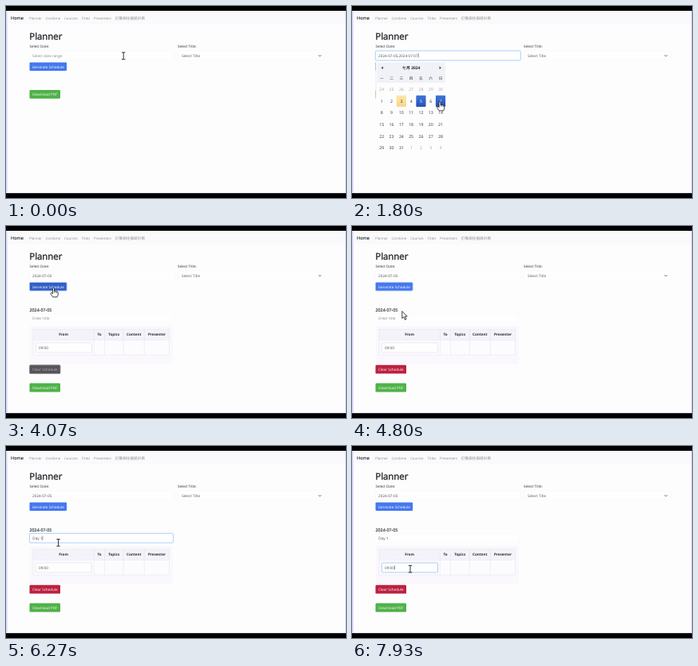
These frames come from a looping animation (426x240 px, 8 s). An HTML page:

```html
<!DOCTYPE html>
<html lang="en">
<head>
<meta charset="utf-8">
<title>Planner</title>
<style>
  html, body { margin: 0; width: 100%; height: 100%; overflow: hidden; background: #000; }
  svg { display: block; width: 100vw; height: 100vh; }
  text {
    font-family: "Open Sans", "Noto Sans", "Noto Sans CJK TC", "Noto Sans CJK", sans-serif;
    white-space: pre; text-rendering: geometricPrecision;
  }
</style>
</head>
<body>
<svg id="stage" viewBox="0 0 426 240"></svg>
<script>
const LOOP = 8000;
const stage = document.getElementById('stage');

function el(parent, tag, attrs = {}, content) {
  const node = document.createElementNS('http://www.w3.org/2000/svg', tag);
  for (const k in attrs) node.setAttribute(k, attrs[k]);
  if (content !== undefined) node.textContent = content;
  return parent.appendChild(node);
}
const group = (parent = stage) => el(parent, 'g');
const box = (p, x, y, w, h, fill, more = {}) =>
  el(p, 'rect', { x, y, width: w, height: h, fill, ...more });
const label = (p, x, y, str, size = 4.6, fill = '#2a2a2c', more = {}) =>
  el(p, 'text', { x, y, 'font-size': size, fill, ...more }, str);
const line = (p, d, stroke, width = 0.5, more = {}) =>
  el(p, 'path', { d, stroke, 'stroke-width': width, fill: 'none', ...more });
const mid = { 'text-anchor': 'middle' };
// Medium weight: regular letters with a thin outline
const medium = width => ({ stroke: '#212529', 'stroke-width': width });
const show = (node, on) => node.setAttribute('display', on ? 'inline' : 'none');

function button(p, x, y, w, h, color, str) {
  const g = group(p);
  const face = box(g, x, y, w, h, color, { rx: 1.2, 'stroke-width': 0.8 });
  const text = label(g, x + w / 2, y + h / 2 + 2, str, 4.55, '#fff', mid);
  return { g, face, text };
}

// Input with value, focus ring and blinking caret
function field(p, x, y, w, h, border, pad = 3.8) {
  const face = box(p, x, y, w, h, '#fefefe', { rx: 1.2, 'stroke-width': 0.7 });
  const text = label(p, x + pad, y + h / 2 + 1.7, '', 4.65);
  const caret = box(p, 0, y + h / 2 - 2.7, 0.5, 5.4, '#333');
  return (value, hint, focus, blink) => {
    text.textContent = value || hint;
    text.setAttribute('fill', value ? '#505054' : '#85858a');
    face.setAttribute('stroke', focus ? '#8fb9f2' : border);
    show(caret, focus && blink);
    if (focus) {
      const end = value ? text.getComputedTextLength() : 0;
      caret.setAttribute('x', x + pad + end + 0.2);
    }
  };
}

// Page
box(stage, 0, 0, 426, 240, '#000');
box(stage, 0, 6, 426, 228, '#d0d0fa');
box(stage, 1.6, 6, 423.4, 227.2, '#fdfdfe');
box(stage, 1.6, 6, 423.4, 17, '#fafafc');
label(stage, 6, 17.1, 'Home', 5.65, '#212529', medium(0.1));
[['Planner', 29], ['Combine', 49.5], ['Courses', 73], ['Titles', 94.5],
 ['Presenters', 110], ['訂餐與住宿統計表', 136.8]].forEach(([s, x], i) =>
  label(stage, x, 16.7, s, i < 5 ? 4.45 : 4.7, '#8c8c90'));
label(stage, 29.3, 42, 'Planner', 11.4, '#212529', medium(0.35));
label(stage, 29.5, 52.3, 'Select Date:', 4.5);
label(stage, 215, 52.3, 'Select Title:', 4.5);
const dateField = field(stage, 29.3, 56, 182, 12, '#f7f7fa');
box(stage, 215.3, 56, 184, 12, '#fefefe', { rx: 1.2, stroke: '#f7f7fa', 'stroke-width': 0.7 });
label(stage, 220, 63.8, 'Select Title', 4.65, '#5c5c60');
line(stage, 'M391.6 61.3l1.7 1.7 1.7-1.7', '#444', 0.8);
const generate = button(stage, 29.5, 70.4, 46.6, 10.6, '#4478ee', 'Generate Schedule');

// Schedule
const schedule = group();
label(schedule, 29.5, 107.3, '2024-07-05', 5.35, '#212529', medium(0.1));
const titleField = field(schedule, 29.5, 109.2, 180, 11.8, '#fafafc');
box(schedule, 30, 125, 179, 48, '#faf8fd');
box(schedule, 34, 129.2, 170.6, 13.4, '#f5f3fa');
box(schedule, 34, 142.6, 170.6, 18.6, '#fcfbfe');
const dots = { 'stroke-dasharray': '1 0.7' };
line(schedule, 'M34 129.2H204.6V161.2H34zM34 142.6H204.6M110.3 129.2V161.2M123.6 129.2V161.2M147 129.2V161.2M173.3 129.2V161.2',
  '#d5d0e0', 0.5, dots);
[['From', 72], ['To', 117], ['Topics', 135.2], ['Content', 160.2], ['Presenter', 189]].forEach(([s, x]) =>
  label(schedule, x, 137.4, s, 4.55, '#2a2a2c', { ...mid, 'font-weight': 700 }));
const timeField = field(schedule, 37.2, 146, 70.3, 12, '#e2dfea');
const clear = button(schedule, 29.5, 173.8, 38.5, 10.8, '#bd2140', 'Clear Schedule');
const download = button(stage, 29.5, 105, 38.5, 10.8, '#4fb248', 'Download PDF');

// Date picker
const defs = el(stage, 'defs');
function gradient(id, from, to) {
  const g = el(defs, 'linearGradient', { id, x1: 0, y1: 0, x2: 0, y2: 1 });
  el(g, 'stop', { offset: 0, 'stop-color': from });
  el(g, 'stop', { offset: 1, 'stop-color': to });
}
gradient('picked', '#3f76dc', '#2350b4');
gradient('today', '#fde79f', '#fbd48c');

const picker = group();
box(picker, 30, 70, 87.4, 116, '#fdfdfe');
box(picker, 31.4, 70.6, 85.6, 25.6, '#f0f2f7');
line(picker, 'M30 70V115', '#e0e0ea', 0.5);
label(picker, 74.2, 79, '七月 2024', 4.9, '#222', { ...mid, 'font-weight': 700 });
el(picker, 'path', { d: 'M38.8 75.5v3.4l-2.2-1.7zM109.6 75.5v3.4l2.2-1.7z', fill: '#333' });
const colX = c => 37.3 + 12.28 * c;
const rowY = r => 104.4 + 14.55 * r;
[...'一二三四五六日'].forEach((s, c) => label(picker, colX(c), 91.8, s, 4.7, '#333', mid));
const dayCells = {};
for (let i = 0; i < 42; i++) {
  const x = colX(i % 7), y = rowY(Math.floor(i / 7));
  const day = i - 6, inside = day > 0 && day < 32;
  const num = day < 1 ? day + 30 : inside ? day : day - 31;
  const isToday = day === 3, pickable = day === 5 || day === 7;
  const face = isToday || pickable
    ? box(picker, x - 6.1, y - 7.1, 12.2, 14.2, isToday ? 'url(#today)' : 'url(#picked)', { rx: 1 }) : null;
  const text = label(picker, x, y + 1.9, num, 5.2, inside ? '#333' : '#a8a8aa', mid);
  if (pickable) dayCells[day] = { face, text };
}
function pick(day, on) {
  show(dayCells[day].face, on);
  dayCells[day].text.setAttribute('fill', on ? '#fff' : '#333');
}

// Pointers, drawn around their hot spots
const ink = { fill: '#fff', stroke: '#111', 'stroke-width': 0.8, 'stroke-linejoin': 'round' };
const pointers = { beam: group(), hand: group(), arrow: group() };
line(pointers.beam, 'M-2.2-4.3H2.2M-2.2 4.3H2.2M0-4.3V4.3', '#222', 0.9);
el(pointers.arrow, 'path', { d: 'M0 0V9l2.1-1.9 1.6 3.6 1.5-.7-1.6-3.5H6.4z', ...ink });
el(pointers.hand, 'path', {
  d: 'M-1 .8Q0-.8 1 .8V4.4Q2 3.7 2.7 4.6 3.7 4 4.3 5 5.6 4.6 5.7 6V8.2Q5.6 10 4.6 11.6H-.7Q-2.6 9.3-3.6 7.2-3.2 5.7-1.8 6.6L-1 7.4z', ...ink });
line(pointers.hand, 'M1 4.4V6.4M2.7 4.6V6.5M4.3 5V6.7', '#111', 0.5);

// [start, end, x, y]
const moves = [
  [350, 950, 87, 119], [1200, 1500, 110, 119.3], [2450, 2800, 125, 119],
  [3200, 3750, 59.5, 77.2], [4300, 4950, 63.3, 111], [6100, 6650, 73, 153.7]
];
const ease = u => u * u * (3 - 2 * u);
function pointerAt(t) {
  let x = 147.2, y = 62.3;
  for (const [a, b, tx, ty] of moves) {
    const k = ease(Math.min(1, Math.max(0, (t - a) / (b - a))));
    x += (tx - x) * k;
    y += (ty - y) * k;
  }
  return [x, y];
}

const OPEN = 330, PICK_A = 1050, PICK_B = 1580, UNPICK = 2250, CLOSE = 3250;
const BUILD = 3930, TITLE = 5000, TIME = 6700;
const keys = [5220, 5320, 5430, 5530, 5850];

function render(t) {
  const open = t >= OPEN && t < CLOSE;
  const built = t >= BUILD;
  const both = t >= PICK_B && t < UNPICK;
  const blinkFrom = since => (t - since) % 1060 < 530;

  const date = t < PICK_A ? '' : '2024-07-05' + (both ? ',2024-07-07' : '');
  const lastEdit = [OPEN, PICK_A, PICK_B, UNPICK].filter(k => k <= t).pop() || 0;
  dateField(date, 'Select date range', open, blinkFrom(lastEdit));
  show(picker, open);
  pick(5, t >= PICK_A);
  pick(7, both);

  const [x, y] = pointerAt(t);
  const within = (l, r, top, bottom) => x >= l && x <= r && y >= top && y <= bottom;
  const overButton = !open && within(29.5, 76, 70.4, 81);
  generate.face.setAttribute('fill', overButton ? '#315fc6' : '#4478ee');
  generate.face.setAttribute('stroke', built && t < TITLE ? '#a9c1f5' : 'none');

  show(schedule, built);
  const typed = 'Day 1'.slice(0, keys.filter(k => k <= t).length);
  const lastKey = keys.filter(k => k <= t).pop() || TITLE;
  titleField(typed, 'Enter title', t >= TITLE && t < TIME, blinkFrom(lastKey));
  timeField('09:00', '', t >= TIME, t >= 7500);
  const fresh = t < 4200;
  clear.face.setAttribute('fill', fresh ? '#56545a' : '#bd2140');
  clear.face.setAttribute('stroke', fresh ? '#8a8690' : 'none');
  clear.text.setAttribute('fill', fresh ? '#b5b3b8' : '#fff');
  download.g.setAttribute('transform', `translate(0 ${built ? 91.6 : 0})`);

  const hand = overButton || (open && within(31, 117, 97, 185));
  const beam = within(29.3, 211, 56, 68) ||
    (built && (within(29.5, 209.5, 109.2, 121) || within(37, 107.5, 146, 158)));
  const kind = hand ? 'hand' : beam ? 'beam' : 'arrow';
  for (const k in pointers) show(pointers[k], k === kind);
  pointers[kind].setAttribute('transform', `translate(${x} ${y})`);
}

function tick() {
  render(performance.now() % LOOP);
  requestAnimationFrame(tick);
}
tick();
</script>
</body>
</html>
```
